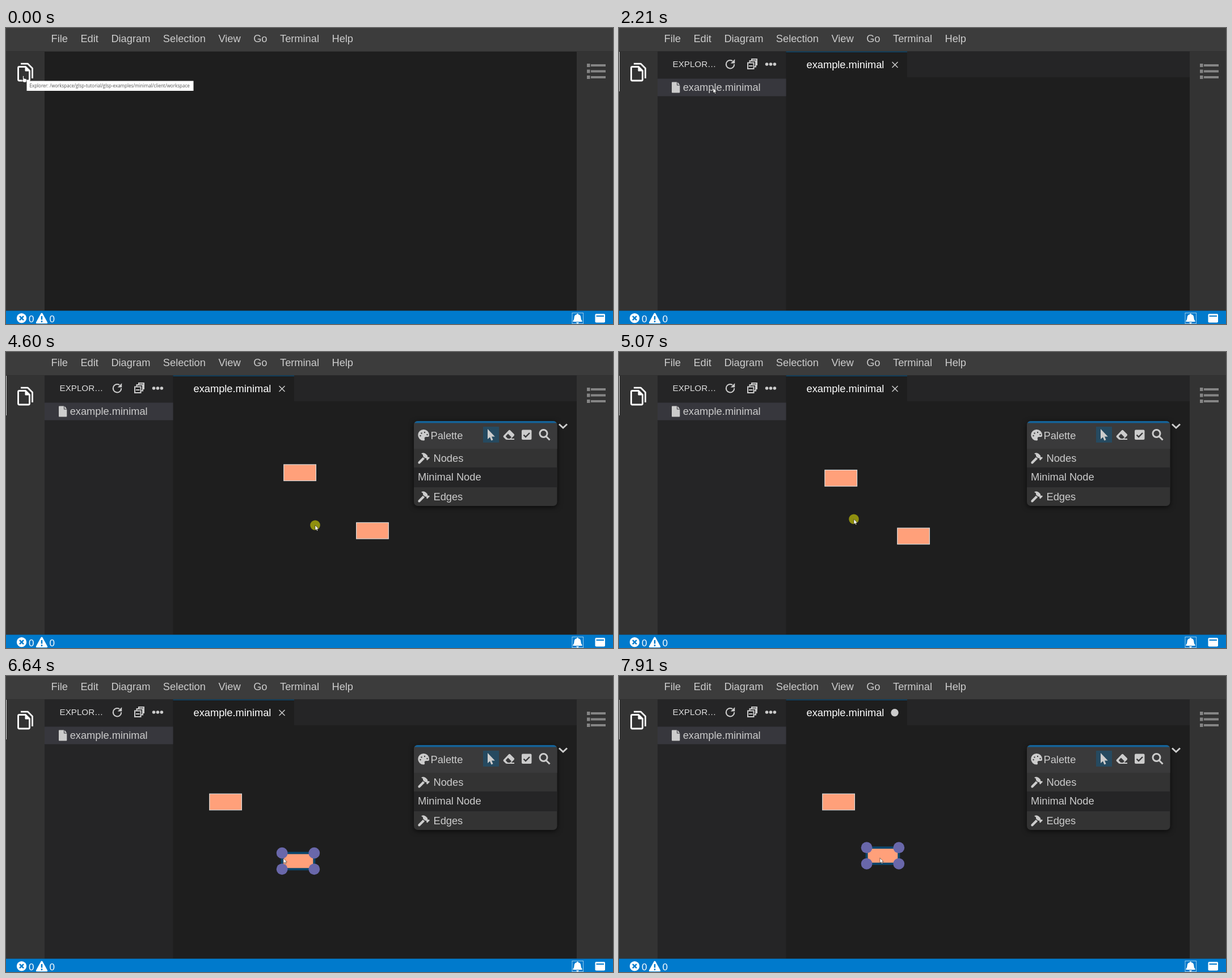
Animation of 1070 by 523 pixels, one loop 7.99 s. Source, as an HTML page:

```html
<!DOCTYPE html>
<html lang="en">
<head>
<meta charset="utf-8">
<title>Diagram editor</title>
<style>
  html, body { margin: 0; width: 100%; height: 100%; overflow: hidden; background: #1e1e1e; }
  svg { display: block; }
  text { font: 18.25px "Liberation Sans", Arial, sans-serif; fill: #ccc; white-space: pre; }
  .line { fill: none; stroke: #ccc; stroke-width: 2; }
  .bold { stroke-width: 3; }
  .icon { fill: #ccc; }
  .white { fill: #fff; }
  .small { font-size: 15.2px; fill: #ddd; }
  .count { font-size: 17px; fill: #fff; }
  .hint { font: 8.03px "Open Sans", "Noto Sans", sans-serif; fill: #555; }
  .node rect { fill: #ffa07a; stroke: #d8d8d8; stroke-width: 1.2; }
  .node.active rect { stroke: #0a466c; stroke-width: 4; }
  .node circle { fill: #6967aa; visibility: hidden; }
  .node.selected circle { visibility: visible; }
</style>
</head>
<body>
<svg width="1070" height="523" viewBox="0 0 1070 523">
  <defs>
    <g id="hammer" class="icon">
      <path d="M.8 16.500 9 8.300l3 3-8.200 8.200q-1.500 1-3 0-1-1.500 0-3z"/>
      <path d="M6 2q4-2.500 8 .5l3 3v2l1 1 1.500-.5 1.500 1.500-4.500 4.500-1.500-1.500.5-1.500-1-1h-2L9 6.500V4z"/>
    </g>
  </defs>

  <rect width="1070" height="523" fill="#1e1e1e"/>
  <rect width="1070" height="41.500" fill="#3c3c3c"/>
  <path d="M0 41.500h68v458H0zM1006 41.500h64v458h-64z" fill="#333"/>
  <g id="menu"></g>
  <g id="outline" fill="#858585"></g>

  <g fill="none" stroke="#fff" stroke-width="2.800" stroke-linejoin="round">
    <path d="M23.500 68.500h11l7 7v15.500q0 2-2 2h-16q-2 0-2-2v-20.500q0-2 2-2z"/>
    <path d="M34 68.500v7.500h7.500z" class="white" stroke-width="1"/>
    <path d="M26 63.200h12.500l8 8V89"/>
  </g>

  <g id="explorer">
    <rect x="68" y="41.500" width="226.500" height="458" fill="#252526"/>
    <rect id="bar" y="42" width=".8" height="70"/>
    <text class="small" x="94.500" y="69">EXPLOR…</text>
    <path class="line" d="M200 58.200A7.200 7.200 0 1 0 203.200 64"/>
    <path class="icon" d="M204.200 55v7.500h-7.500z"/>
    <path class="line" d="M227 61.500h10.500v10.500H227zM230.500 61v-3h10.500v10.500h-3M234 57v-2h9v10h-2M229 67h6.500"/>
    <path class="line" d="M260.500 64h14" style="stroke-width:5.500;stroke-linecap:round;stroke-dasharray:.1 6.800"/>
    <rect id="itemBack" x="68" y="89.500" width="226.500" height="31"/>
    <path id="fileIcon" d="M94 95.500h8v6h5.300v12q0 1-1 1H94q-1 0-1-1v-17q0-1 1-1zM103 95.500l4.300 5h-4.300z"/>
    <text id="fileName" x="112.700" y="110.500">example.minimal</text>
  </g>

  <g id="tab">
    <rect x="294.500" y="41.500" width="711.500" height="45.500" fill="#252526"/>
    <rect x="294.500" y="41.500" width="213.500" height="45.500" fill="#1e1e1e"/>
    <rect x="294.500" y="41.500" width="213.500" height="1.300" fill="#0b4f7a"/>
    <text class="white" x="330.500" y="71" style="fill:#fff">example.minimal</text>
    <path id="close" class="line" d="M481.500 60l10 10m0-10-10 10" style="stroke-width:1.500"/>
    <circle id="dirty" class="icon" cx="486" cy="64.800" r="6.700"/>
  </g>

  <g id="nodes"></g>

  <g id="palette">
    <rect x="719" y="122" width="252.500" height="150" rx="7" fill="#333" style="filter:drop-shadow(0 2px 5px #000a)"/>
    <path d="M719 171v-42q0-7 7-7h238.500q7 0 7 7v42z" fill="#3a3a3b"/>
    <path d="M720 125.500q2-3.500 6-3.500h238.500q4 0 6 3.500z" fill="#14639a"/>
    <rect x="719" y="204" width="252.500" height="35" fill="#252526"/>
    <text x="748.500" y="153.500">Palette</text>
    <text x="753.500" y="194">Nodes</text>
    <text x="726" y="227.300">Minimal Node</text>
    <text x="753.500" y="262">Edges</text>
    <use href="#hammer" x="726" y="177.500"/>
    <use href="#hammer" x="726" y="245.500"/>
    <g class="icon">
      <path d="M736 137a9.700 9.700 0 1 0 0 19.500q2.500 0 2-2.500-1.200-3.500 2-4h4q2 0 2-3A9.700 9.700 0 0 0 736 137z"/>
      <path d="M877 148l9-9.500q1.500-1.500 3 0l6.500 6.500q1.500 1.500 0 3l-5 5h5.500v2h-13q-1.500 0-2.500-1l-3.500-3.500q-1-1.200 0-2.500z"/>
      <rect x="909" y="137.500" width="17.500" height="17.500" rx="2"/>
    </g>
    <g fill="none" stroke="#3a3a3b" stroke-width="2.400">
      <path d="M730.500 148v-.1m2-4.400v-.1m5.500-1.400v-.1m4.500 4.200v-.1" stroke-linecap="round"/>
      <path d="M912.500 146.500l3.500 3.500 7-7"/>
      <path d="M881.500 148l3.500-3.500 6 6-2.500 2.500h-4l-3-3q-1-1 0-2z" fill="#3a3a3b" stroke="none"/>
    </g>
    <rect x="841" y="132" width="28" height="28" fill="#264a60"/>
    <path class="icon" d="M849 136v18l4-3.500 2.500 6 3-1.200-2.500-5.800h5.800z"/>
    <path class="line bold" d="M941 144a6.500 6.500 0 1 1 13 0a6.500 6.500 0 1 1-13 0M952 149l6.500 6.500M975 127.500l7 6.500 7-6.500"/>
  </g>

  <rect y="499.500" width="1070" height="23.500" fill="#007acc"/>
  <circle class="white" cx="27.500" cy="512.700" r="8.600"/>
  <path class="white" d="M61.500 504.500q1.500-2 3 0l8.500 15.500q.8 2-1.500 2H54.500q-2.300 0-1.500-2z"/>
  <path d="M24 509.200l7 7m0-7-7 7M63 509v6.500m0 1.700v2.800" stroke="#007acc" stroke-width="2.500"/>
  <text class="count" x="40" y="519.500">0</text>
  <text class="count" x="76.500" y="519.500">0</text>
  <rect x="998" y="503.500" width="19.500" height="19" fill="none" stroke="#9ccbec"/>
  <path class="white" d="M1007.500 504.500q1.300 0 1.300 1.500 4.700 1 4.700 6.500 0 3 2 5v1.500h-16V517.500q2-2 2-5 0-5.500 4.700-6.500 0-1.500 1.300-1.500zM1005 520h5q-.5 2-2.500 2t-2.500-2z"/>
  <rect class="white" x="1038.500" y="505" width="17.500" height="15.500" rx="2"/>
  <path d="M1040.500 509h13.500" stroke="#007acc" stroke-width="2"/>

  <g id="tooltip">
    <rect class="white" x="36.500" y="93.500" width="294" height="17.500"/>
    <text class="hint" x="41.500" y="105.200">Explorer: /workspace/glsp-tutorial/glsp-examples/minimal/client/workspace</text>
  </g>
  <circle id="press" r="8.800" fill="#ff0" opacity=".5"/>
  <g class="white" stroke="#000" stroke-width=".5">
    <path id="hand" d="M-.5 0q1.300-1 2 .3V4l4 1q1 .3.800 1.500l-1 4.500H.8l-3-4q0-1.500 2 0z"/>
    <path id="arrow" d="M0 0v9l2-1.800 1.300 3 1.500-.6-1.300-2.900h2.800z"/>
  </g>
</svg>
<script>
const LOOP = 7990;
const LAG = 60; // the diagram trails the pointer while dragging

const el = id => document.getElementById(id);
const show = (id, on) => { el(id).style.display = on ? '' : 'none'; };
const place = (id, [x, y]) => el(id).setAttribute('transform', `translate(${x} ${y})`);
const clamp = (v, low, high) => Math.min(high, Math.max(low, v));
const during = (t, [from, to]) => t >= from && t < to;
const add = (...points) => points.reduce(([x, y], [dx, dy]) => [x + dx, y + dy]);

let menuX = 79.5;
for (const label of ['File', 'Edit', 'Diagram', 'Selection', 'View', 'Go', 'Terminal', 'Help']) {
  el('menu').insertAdjacentHTML('beforeend', `<text x="${menuX}" y="25">${label}</text>`);
  menuX += el('menu').lastChild.getComputedTextLength() + 22.5;
}
el('outline').innerHTML = [66, 76.5, 87]
  .map(y => `<path d="M1024 ${y - 3}h5.500v6h-5.500zM1031 ${y - 2}h26v4h-26z"/>`).join('');

const W = 56.7, H = 28.6;
const handles = [[0, 0], [W, 0], [0, H], [W, H]]
  .map(([x, y]) => `<circle cx="${x}" cy="${y}" r="9.900"/>`).join('');
el('nodes').innerHTML = ['first', 'second']
  .map(id => `<g id="${id}" class="node"><rect width="${W}" height="${H}"/>${handles}</g>`).join('');

// Pointer strokes: start time, end time, end point.
const strokes = [
  [1280, 1750, 166, 106],  // to the file
  [2530, 3040, 592, 306],  // into the diagram
  [3040, 3330, 578, 222],
  [3390, 3640, 570, 198],  // over the first node
  [3720, 3920, 586, 222],
  [4120, 4360, 594, 269],
  [4360, 4540, 545, 286],  // pan
  [4540, 4600, 545, 306],
  [4600, 5060, 414, 295.3],
  [5740, 5930, 390, 226],  // first node
  [6120, 6420, 489, 320],  // second node
  [6420, 6480, 489, 322],
  [6660, 6810, 510, 331],
  [7010, 7490, 446, 329],  // move it
  [7640, 7840, 460, 321.5]
];
const pan = [4360, 5420], nudge = [6420, 6480], move = [7010, 7880];
const presses = [[690, 750], [2010, 2100], [5990, 6050], pan, nudge, move];

function pointerAt(t) {
  let [x, y] = [86, 100];
  for (const [from, to, endX, endY] of strokes) {
    const p = clamp((t - from) / (to - from), 0, 1);
    const eased = p * p * (3 - 2 * p);
    x += (endX - x) * eased;
    y += (endY - y) * eased;
  }
  return [x, y];
}

function dragOffset([from, to], t) {
  const [x0, y0] = pointerAt(from);
  return add(pointerAt(clamp(t - LAG, from, to)), [-x0, -y0]);
}

function setNode(id, position, pointer, selected) {
  const [dx, dy] = add(pointer, position.map(v => -v));
  const hovered = dx > 0 && dx < W && dy > 0 && dy < H;
  place(id, position);
  el(id).classList.toggle('active', hovered || selected);
  el(id).classList.toggle('selected', selected);
}

function render(t) {
  const opened = t >= 2200;
  show('tooltip', t < 690);
  show('explorer', t >= 750);
  show('tab', opened);
  show('palette', t >= 2310);
  show('nodes', t >= 2400);
  show('close', t < 6760);
  show('dirty', t >= 6760);

  el('bar').style.fill = opened ? '#fff' : '#094771';
  el('itemBack').style.fill = opened ? '#37373d' : '#094771';
  el('fileIcon').style.fill = el('fileName').style.fill = opened ? '#ccc' : '#fff';

  const pointing = t < 1280;
  const pointer = pointing ? [30, 85] : pointerAt(t);
  show('hand', pointing);
  show('arrow', !pointing);
  show('press', presses.some(span => during(t, span)));
  for (const id of ['hand', 'arrow', 'press']) place(id, pointer);

  const panned = dragOffset(pan, t);
  setNode('first', add([538.7, 181.9], panned), pointer, during(t, [6050, 6420]));
  setNode('second', add([666.6, 284.4], panned, dragOffset(nudge, t), dragOffset(move, t)), pointer, t >= 6420);
}

function tick() {
  render(performance.now() % LOOP);
  requestAnimationFrame(tick);
}
tick();
</script>
</body>
</html>
```
